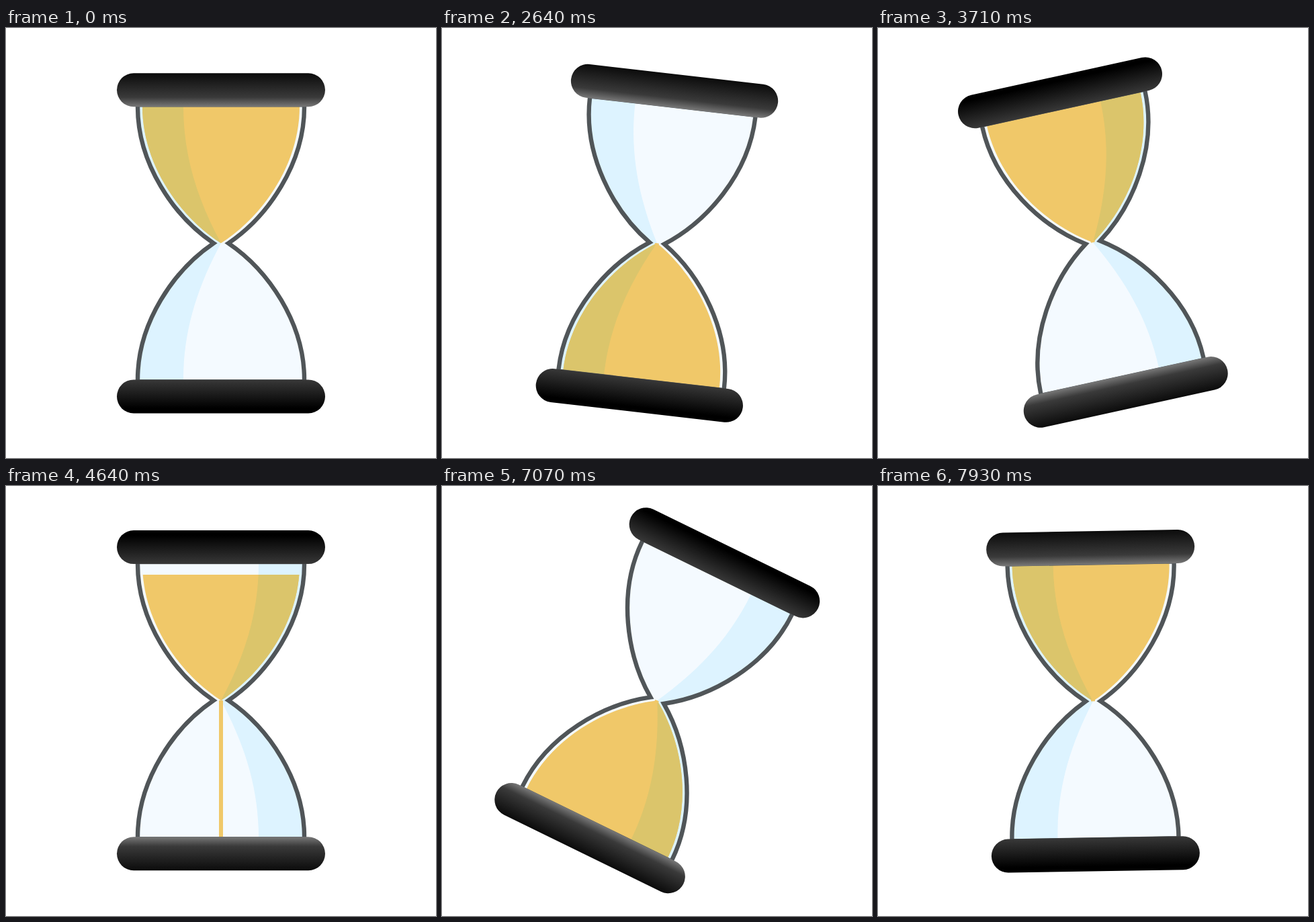
Animation of 640 by 640 pixels, one loop 8 s. Source, as an HTML page:

```html
<!DOCTYPE html>
<html lang="en">
<head>
<meta charset="utf-8">
<title>Hourglass</title>
<style>
  html, body { margin: 0; width: 100%; height: 100%; overflow: hidden; background: #fff; }
  svg { display: block; width: 100vw; height: 100vh; }
</style>
</head>
<body>
<svg viewBox="0 0 640 640">
  <defs>
    <linearGradient id="capTop" x2="0" y2="1">
      <stop offset="0" stop-color="#0b0b0b"/>
      <stop offset=".72" stop-color="#3a3a3a"/>
      <stop offset="1" stop-color="#787878"/>
    </linearGradient>
    <linearGradient id="capBottom" x2="0" y2="1">
      <stop offset="0" stop-color="#383838"/>
      <stop offset=".85" stop-color="#000"/>
    </linearGradient>

    <path id="glass" d="M-124,-206 V-203 C-124,-118 -70,-40 -11,0 C-70,40 -124,118 -124,203 V206
      H124 V203 C124,118 70,40 11,0 C70,-40 124,-118 124,-203 V-206 Z"/>
    <path id="shade" d="M-140,-206 H-56 V-203 C-56,-130 -35,-65 0,0 C-35,65 -56,130 -56,203 V206 H-140 Z"/>
    <path id="heap" d="M-117,203.5 C-117,120 -65,42 0,0 C65,42 117,120 117,203.5 Z"/>

    <clipPath id="inGlass"><use href="#glass"/></clipPath>
    <clipPath id="inShade"><use href="#shade"/></clipPath>
    <clipPath id="aboveBase"><rect x="-130" y="-10" width="260" height="213.5"/></clipPath>
    <clipPath id="belowLevel"><rect id="level" x="-130" width="260"/></clipPath>

    <g id="sand">
      <g id="sandTurn">
        <use href="#heap" transform="scale(1 -1)" clip-path="url(#belowLevel)"/>
        <g clip-path="url(#aboveBase)"><use id="pile" href="#heap"/></g>
      </g>
    </g>
  </defs>

  <g id="hourglass">
    <use href="#glass" fill="#f4faff"/>
    <use href="#shade" fill="#ddf3ff" clip-path="url(#inGlass)"/>
    <use href="#sand" fill="#f0c869"/>
    <g clip-path="url(#inShade)"><use href="#sand" fill="#dbc56b"/></g>
    <g id="streamTurn"><rect id="stream" x="-3" width="6" fill="#f0c869"/></g>
    <use href="#glass" fill="none" stroke="#505558" stroke-width="6.4" stroke-miterlimit="10"/>
    <rect x="-155" y="-253.1" width="310" height="50" rx="25" fill="url(#capTop)"/>
    <rect x="-155" y="203.1" width="310" height="50" rx="25" fill="url(#capBottom)"/>
  </g>
</svg>
<script>
const LOOP = 8000, TICKS = 112, DEPTH = 203.5;
const byId = id => document.getElementById(id);
const set = (id, name, value) => byId(id).setAttribute(name, value);
const clamp = v => Math.min(1, Math.max(0, v));

// Bezier easing with flat ends: control points (x1, 0) and (x2, 1).
function ease(p, x1 = .42, x2 = .58) {
  p = clamp(p);
  if (p === 0 || p === 1) return p;
  let lo = 0, hi = 1;
  for (let i = 0; i < 30; i++) {
    const s = (lo + hi) / 2, r = 1 - s;
    if (3 * x1 * s * r * r + 3 * x2 * s * s * r + s ** 3 < p) lo = s; else hi = s;
  }
  return lo * lo * (3 - 2 * lo);
}

// Each half turn: when sand starts, how long it runs, when the pile starts, and the rotation.
const halves = [
  { drain: 0, run: 28, fill: 4, spin: 34, spinRun: 22, curve: [.42, .58], base: 0 },
  { drain: 59, run: 30, fill: 64, spin: 93, spinRun: 19, curve: [.54, .59], base: 180 }
];

function draw(ms) {
  const tick = ms % LOOP / LOOP * TICKS;
  const h = halves[tick < TICKS / 2 ? 0 : 1];
  const drained = ease((tick - h.drain) / h.run);
  const filled = ease((tick - h.fill) / h.run);
  const angle = h.base + 180 * ease((tick - h.spin) / h.spinRun, ...h.curve);
  const apex = DEPTH * (1 - filled);
  const head = DEPTH * clamp((tick - h.drain) / (h.fill - h.drain)) ** 2;

  set('hourglass', 'transform', `translate(320 319.75) rotate(${angle}) translate(0 .6)`);
  set('sandTurn', 'transform', `rotate(${h.base})`);
  set('streamTurn', 'transform', `rotate(${h.base})`);
  set('level', 'height', DEPTH * (1 - drained));
  set('pile', 'transform', `translate(0 ${apex})`);
  set('stream', 'height', Math.min(head, apex + 3));
}

function loop() {
  draw(performance.now());
  requestAnimationFrame(loop);
}
loop();
</script>
</body>
</html>
```
